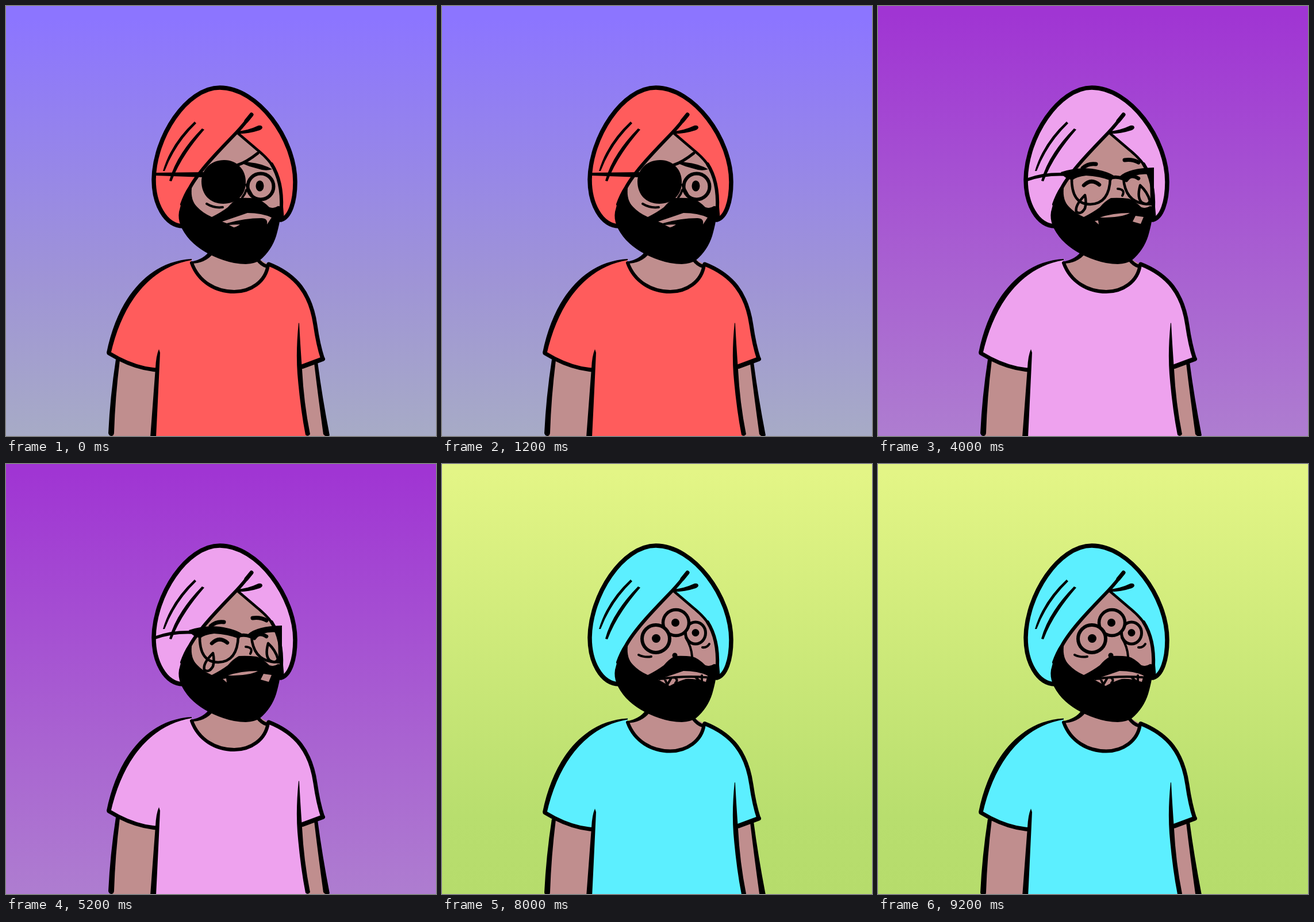
Write an HTML page that moves like this. It is 748x748 px and loops after 10000 ms.

```html
<!DOCTYPE html>
<html lang="en">
<head>
<meta charset="utf-8">
<title>Turban portraits</title>
<style>
  html, body { margin: 0; width: 100%; height: 100%; overflow: hidden; }
  svg {
    display: block; width: 100%; height: 100%;
    fill: none; stroke: #000; stroke-linecap: round; stroke-linejoin: round;
  }
  .ink { fill: #000; stroke: none; }
  .skin { fill: #c08e8e; stroke: none; }
  .cloth { fill: var(--cloth); stroke: none; }
  .lens { fill: #c08e8e; }
  .sky { stroke: none; }

  .scene { visibility: hidden; animation: show 10s step-end infinite; animation-delay: calc(var(--n) * 2s - 10s); }
  @keyframes show {
    0% { visibility: visible; }
    20%, 100% { visibility: hidden; }
  }
</style>
</head>
<body>
<svg viewBox="0 0 748 748">
  <defs>
    <linearGradient id="violet" x2="0" y2="1">
      <stop offset=".03" stop-color="#8c75ff"/><stop offset=".64" stop-color="#9f94d6"/><stop offset="1" stop-color="#a7abc6"/>
    </linearGradient>
    <linearGradient id="coral" x2="0" y2="1">
      <stop offset=".15" stop-color="#ff6565"/><stop offset="1" stop-color="#ff8865"/>
    </linearGradient>
    <linearGradient id="purple" x2="0" y2="1">
      <stop offset=".02" stop-color="#a035d3"/><stop offset="1" stop-color="#ae7dd0"/>
    </linearGradient>
    <linearGradient id="sunset" x2="0" y2="1">
      <stop offset=".02" stop-color="#f79d70"/><stop offset=".62" stop-color="#d07c88"/><stop offset="1" stop-color="#c878a8"/>
    </linearGradient>
    <linearGradient id="lime" x2="0" y2="1">
      <stop offset=".02" stop-color="#e3f586"/><stop offset=".82" stop-color="#b8de6e"/><stop offset="1" stop-color="#b6dc6c"/>
    </linearGradient>

    <g id="body">
      <!-- arms and neck -->
      <path class="skin" d="M195 612Q184 690 183 760H257L264 628Z"/>
      <path class="skin" d="M512 624L540 614Q545 690 558 760H526Q515 690 512 624Z"/>
      <path class="skin" d="M356 426Q345 443 322 446C335 480 365 497 397 497C425 497 452 480 457 450L437 438Z"/>
      <!-- shirt -->
      <path class="cloth" d="M324 440C250 447 200 510 179 604L195 614Q230 631 262 633L256 760H525Q513 680 513 627L551 614Q543 590 538 555C530 500 505 468 457 448C452 480 425 497 397 497C365 497 335 480 322 443Z"/>
      <path class="ink" d="M323 440C249 444 195 505 175 603L182 606C203 513 252 454 323 442Z"/>
      <path stroke-width="7" d="M179 604L195 613Q230 631 262 633"/>
      <path stroke-width="7" d="M457 449C505 468 530 500 538 555Q543 590 551 614"/>
      <path stroke-width="8" d="M551 614L516 627"/>
      <path stroke-width="6" d="M323 447C335 480 365 497 397 497C425 497 452 480 456 450"/>
      <path class="ink" d="M354 426Q345 440 322 445L321 448Q347 448 361 430Z"/>
      <path stroke-width="6" d="M437 440Q444 450 454 453"/>
      <!-- arm outlines -->
      <path class="ink" d="M191 615Q181 680 178 743Q179 748 184 748Q188 747 188 742Q190 680 198 616Z"/>
      <path class="ink" d="M266 597Q261 608 260 630L251 750H261Q264 690 268 603Z"/>
      <path class="ink" d="M509 551Q504 600 507 640Q512 700 521 746Q525 750 529 745Q518 690 515 632Q512 590 510 552Z"/>
      <path class="ink" d="M536 621Q543 680 552 745Q557 751 563 747Q550 680 542 619Z"/>
    </g>

    <g id="head">
      <path class="cloth" d="M308 383C276 382 257 343 257 302C258 228 314 142 372 142C438 142 503 231 503 306C503 340 494 368 478 372Z"/>
      <path class="skin" d="M402 220C370 252 335 290 320 318L330 390L430 420L478 365Q483 310 464 277Q440 248 402 220Z"/>
      <path stroke-width="7.500" d="M308 383C276 382 257 343 257 302C258 228 314 142 372 142C438 142 503 231 503 306C503 340 494 368 478 372"/>
      <path stroke-width="6" d="M427 189Q414 206 402 219C370 252 335 288 320 316Q312 328 306 345"/>
      <path stroke-width="7" d="M427 189L418 200"/>
      <path stroke-width="4.500" d="M403 221L437 250Q458 267 466 282"/>
      <path stroke-width="6" d="M462 275Q481 305 479 352"/>
      <path class="ink" d="M401 218Q420 217 439 208Q446 207 446 212Q444 216 438 217Q420 223 402 222Z"/>
      <path class="ink" d="M328 201Q287 239 273 287L276 287Q294 240 331 204Z"/>
      <path class="ink" d="M341 213Q296 259 284 304L288 305Q304 262 345 215Z"/>
      <!-- beard and moustache -->
      <path class="ink" d="M322 315Q305 336 301 358Q297 381 320 407Q342 430 378 442Q398 449 417 449Q434 448 442 442Q462 425 470 400Q474 386 476 375L484 372L482 349L473 348Q466 353 458 350Q446 338 436 335Q420 333 405 334Q394 340 386 350Q374 359 358 367Q342 360 332 349Q321 338 323 317Z"/>
    </g>
  </defs>

  <g class="scene" style="--n:0;--cloth:#ff5c5c">
    <rect class="sky" width="748" height="748" fill="url(#violet)"/>
    <use href="#body"/>
    <use href="#head"/>
    <path class="ink" d="M261 290L345 289V298L261 295Z"/>
    <path stroke-width="5" d="M402 277Q418 272 438 256"/>
    <path class="ink" d="M411 274Q416 270 424 272Q446 274 463 284Q452 288 438 283Q424 280 411 274Z"/>
    <ellipse stroke-width="6" cx="443" cy="314" rx="22.500" ry="22.500"/>
    <ellipse class="ink" cx="441.500" cy="313" rx="7" ry="9.500"/>
    <path stroke-width="4" d="M418 311L429 331M418 320Q416 327 411 333"/>
    <path class="ink" d="M379 268C400 267 418 284 417 307C417 330 400 344 378 344C355 344 340 328 340 305C341 282 358 268 379 268Z"/>
    <path stroke-width="4" d="M349 344Q362 352 377 350"/>
    <path class="skin" d="M376 375Q400 367 420 360Q445 360 462 368L454 380Q456 369 444 369Q415 369 384 378Z"/>
    <path class="skin" d="M388 381Q400 380 407 380Q400 385 396 385Z"/>
  </g>

  <g class="scene" style="--n:1;--cloth:#5cefff">
    <rect class="sky" width="748" height="748" fill="url(#coral)"/>
    <use href="#body" y="2.500"/>
    <use href="#head"/>
    <g stroke-width="4">
      <path d="M264 299Q262 293 271 293Q305 294 336 299"/>
      <ellipse cx="364.500" cy="303" rx="28.500" ry="26"/>
      <ellipse cx="442" cy="301" rx="25.500" ry="25.500"/>
      <path d="M393 295Q405 289 417 294"/>
      <path d="M424 324Q434 327 436 334"/>
    </g>
    <path stroke-width="10" d="M353 289Q362 276 383 277M432 276Q450 277 460 292"/>
    <path stroke-width="7" d="M363 325Q366 311 376 311Q385 313 389 319M436 317Q445 302 455 316"/>
    <path class="skin" d="M377 375Q400 367 420 361Q445 359 462 367L458 379Q442 375 434 372Q424 374 412 381L400 385Z"/>
    <path stroke-width="5" d="M395 371Q398 379 406 384"/>
  </g>

  <g class="scene" style="--n:2;--cloth:#eea2ee">
    <rect class="sky" width="748" height="748" fill="url(#purple)"/>
    <use href="#body"/>
    <use href="#head"/>
    <path stroke-width="5.500" d="M260 302Q290 291 328 293"/>
    <path class="ink" d="M318 289Q345 280 372 283Q398 287 410 295L406 304Q385 296 362 295Q345 297 338 303Q322 299 318 289Z"/>
    <path class="ink" d="M421 296Q436 282 480 281V345H474L473 293Q448 290 430 304Z"/>
    <path stroke-width="4.500" d="M337 298Q336 345 369 345Q403 344 404 299M427 300Q430 339 462 344L478 345"/>
    <path stroke-width="6" d="M405 299Q415 296 425 300"/>
    <path stroke-width="7" d="M356 282Q366 273 379 275M429 268Q442 266 453 272"/>
    <path stroke-width="6.500" d="M358 312Q371 299 385 311M432 303Q440 291 453 300"/>
    <path stroke-width="4" d="M417 318Q431 319 425 330"/>
    <path stroke-width="4.500" d="M360 329Q342 347 345 358Q353 364 360 352Q363 342 360 329ZM456 312Q450 334 459 342Q470 348 473 339Q469 324 456 312Z"/>
    <path class="skin" d="M377 374L383 373L384 380Z"/>
    <path class="skin" d="M386 368Q408 360 438 360Q425 368 386 368Z"/>
    <path class="skin" d="M448 365L462 367L457 379L443 375Z"/>
  </g>

  <g class="scene" style="--n:3;--cloth:#fdff7d">
    <rect class="sky" width="748" height="748" fill="url(#sunset)"/>
    <use href="#body"/>
    <use href="#head"/>
    <path stroke-width="8" d="M383 265Q396 253 412 253C432 254 441 268 441 288C441 312 429 324 407 324C383 324 371 311 371 289C371 269 382 255 405 252"/>
    <ellipse class="ink" cx="408" cy="290" rx="7.500" ry="12"/>
    <path class="skin" d="M376 374Q400 366 420 360Q445 359 462 367L458 378Q446 373 430 373Q414 375 405 382L396 384Z"/>
    <path stroke-width="4" d="M380 375Q410 372 440 371"/>
    <path class="ink" d="M388 369L396 372L397 386H388Z"/>
    <path stroke-width="4" d="M433 362L444 373"/>
  </g>

  <g class="scene" style="--n:4;--cloth:#5cefff">
    <rect class="sky" width="748" height="748" fill="url(#lime)"/>
    <use href="#body" y="2.500"/>
    <use href="#head"/>
    <ellipse stroke-width="5" cx="441" cy="294" rx="17.500" ry="19"/>
    <circle class="ink" cx="441" cy="293.500" r="6.500"/>
    <circle class="lens" stroke-width="5.500" cx="407" cy="276" r="22.500"/>
    <circle class="ink" cx="406" cy="276" r="7"/>
    <circle class="lens" stroke-width="6" cx="372" cy="304" r="24"/>
    <circle class="ink" cx="372.500" cy="303.500" r="7.500"/>
    <path stroke-width="4" d="M424 302Q434 318 435 335M342 332Q352 337 364 335M453 319Q461 320 465 313"/>
    <circle class="ink" cx="405" cy="333" r="4.500"/>
    <path class="skin" d="M376 375Q400 367 420 360Q445 360 462 368L459 379Q440 373 424 374Q410 378 396 386Z"/>
    <path stroke-width="4" d="M378 374Q420 368 460 371M387 373L392 384L399 372M404 371Q412 375 406 381M441 371L449 378M452 368V379"/>
  </g>
</svg>
</body>
</html>
```
